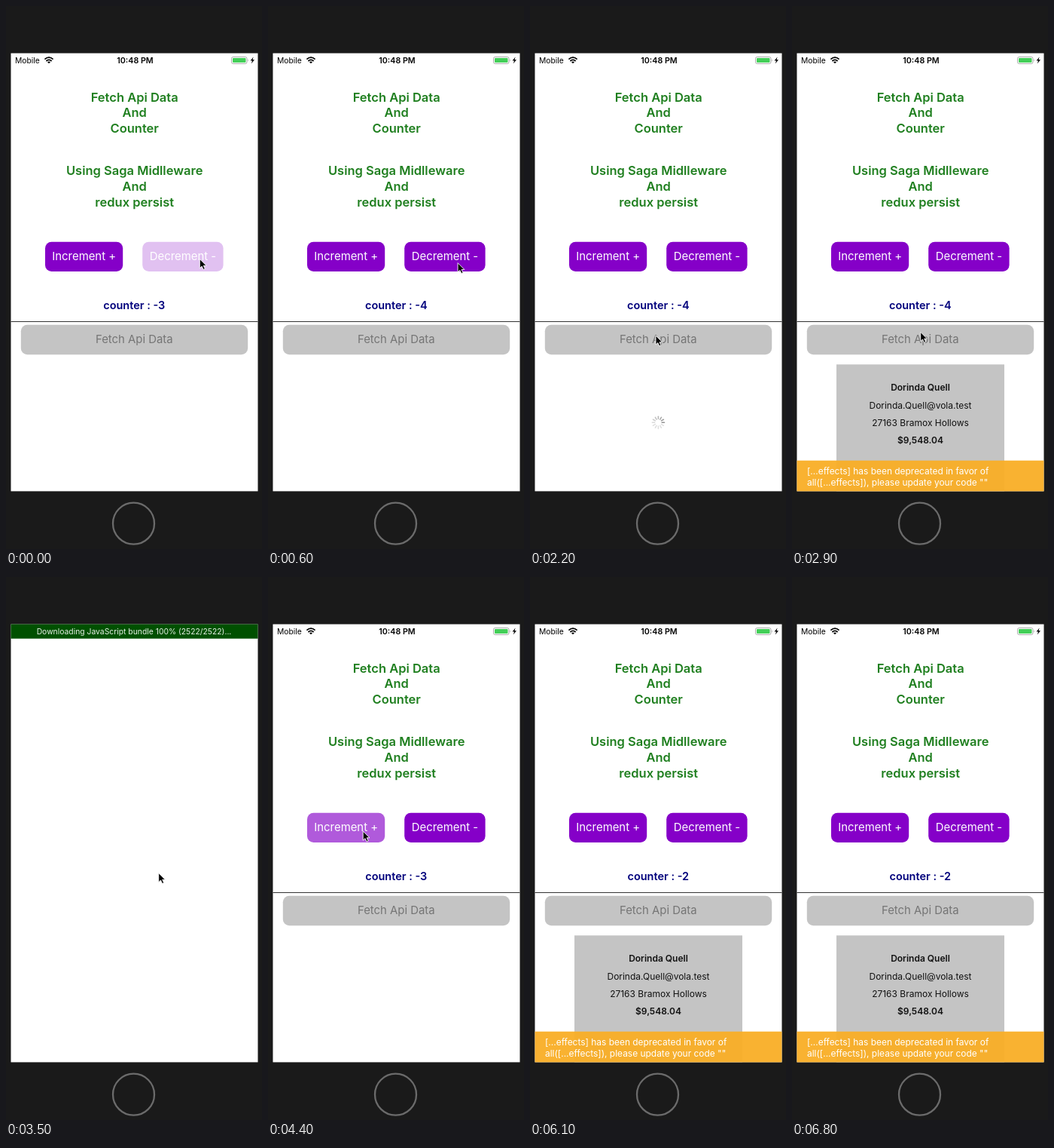
These frames come from a looping animation (340 by 720 pixels, 6.9 s). An HTML page:

```html
<!DOCTYPE html>
<html lang="en">
<head>
<meta charset="utf-8">
<title>Counter and fetch demo</title>
<style>
  html, body { margin: 0; width: 100%; height: 100%; overflow: hidden; background: #1a1a1a; }
  svg { display: block; width: 340px; height: 720px; font-family: Inter, Roboto, sans-serif; }
  .mid { text-anchor: middle; }
  .bold { font-weight: 600; }
  .title { font-size: 16.5px; fill: #1f7f1f; }
  .label { font-size: 14.9px; }
  .card { font-size: 12px; fill: #111; }
  .warn { font-size: 11.95px; fill: #fff; }
</style>
</head>
<body>
<svg viewBox="0 0 340 720">
  <rect width="340" height="720" fill="#1a1a1a"/>
  <rect x="6.5" y="62.6" width="328" height="580.8" fill="#fff"/>
  <circle cx="169.5" cy="686.2" r="27.5" fill="none" stroke="#6b6b6b" stroke-width="2.3"/>

  <g id="status">
    <text x="12" y="75.5" font-size="10.3">Mobile</text>
    <g fill="none" stroke="#000" stroke-width="1.7">
      <path d="M51.4 70.6Q57 65.6 62.6 70.6M53.4 73Q57 69.8 60.6 73"/>
      <path d="M55 74.2Q57 72.6 59 74.2L57 76.3Z" fill="#000" stroke="none"/>
    </g>
    <text class="mid bold" x="171.5" y="75.7" font-size="10.7">10:48 PM</text>
    <rect x="299.5" y="67.5" width="20.5" height="9" rx="2.2" fill="#fff" stroke="#999" stroke-width=".8"/>
    <rect x="301" y="69" width="17.5" height="6" rx="1" fill="#43cf58"/>
    <path d="M321 70.3q1.4 1.7 0 3.4z" fill="#999"/>
    <path d="M328.6 67.5L324.6 72.6H327L325.8 76.5L330 71.2H327.5Z"/>
  </g>

  <g id="app">
    <g id="titles" class="title mid bold"></g>
    <g id="increment">
      <rect x="52" y="312.8" width="103.2" height="39.3" rx="8.5" fill="#8500c8"/>
      <text class="label mid" x="103.7" y="337" fill="#fff">Increment +</text>
    </g>
    <g id="decrement">
      <rect x="181.2" y="312.8" width="107.4" height="39.3" rx="8.5" fill="#8500c8"/>
      <text class="label mid" x="235" y="337" fill="#fff">Decrement -</text>
    </g>
    <text id="counter" class="mid bold" x="170.3" y="401.6" font-size="14.5" fill="#00007c"></text>
    <rect x="6.5" y="418" width="328" height="1" fill="#333"/>
    <g id="fetch">
      <rect x="19.8" y="422.8" width="301.4" height="39.5" rx="8.5" fill="#c4c4c4"/>
      <text class="label mid" x="170.3" y="447.3" fill="#757575">Fetch Api Data</text>
    </g>
    <g id="spinner" stroke-width="1.5" stroke-linecap="round"></g>
    <g id="card" class="card mid">
      <rect x="59" y="475.3" width="223" height="168" fill="#c4c4c4"/>
      <text class="bold" x="170.5" y="510">Dorinda Quell</text>
      <text x="170.5" y="533.5">Dorinda.Quell@vola.test</text>
      <text x="170.5" y="556.7">27163 Bramox Hollows</text>
      <text class="bold" x="170.5" y="580.2">$9,548.04</text>
    </g>
    <g id="warning" class="warn">
      <rect x="6.5" y="602.7" width="328" height="40.7" fill="#f9ae26" opacity=".95"/>
      <text x="20" y="621.3">[...effects] has been deprecated in favor of</text>
      <text x="20" y="636">all([...effects]), please update your code ""</text>
    </g>
  </g>

  <g id="loading">
    <rect x="6.5" y="62.6" width="328" height="19.1" fill="#005000"/>
    <text class="mid" x="170" y="76.2" font-size="10.35" fill="#e8f0e8">Downloading JavaScript bundle 100% (2522/2522)...</text>
  </g>

  <path id="cursor" d="M0 0V12.2L2.8 9.6L4.8 14L7 13L5 8.8H8.8Z" fill="#000" stroke="#fff" stroke-width=".9" stroke-linejoin="round"/>
</svg>
<script>
const LOOP = 6900, STEP = 100;
const NS = "http://www.w3.org/2000/svg";
const $ = id => document.getElementById(id);

function add(parent, tag, attrs, text = "") {
  const node = document.createElementNS(NS, tag);
  for (const key in attrs) node.setAttribute(key, attrs[key]);
  node.textContent = text;
  parent.append(node);
  return node;
}

const show = (id, on) => $(id).setAttribute("display", on ? "inline" : "none");
const within = (t, ...spans) => spans.some(([from, to]) => t >= from && t < to);
const clamp = v => Math.max(0, Math.min(1, v));
const ease = v => v * v * (3 - 2 * v);

[["Fetch Api Data", 127], ["And", 147.3], ["Counter", 168],
 ["Using Saga Midlleware", 224.3], ["And", 245], ["redux persist", 265.6]]
  .forEach(([text, y]) => add($("titles"), "text", { x: 170.7, y }, text));

const SPOKES = 12;
const spokes = Array.from({ length: SPOKES }, (_, i) =>
  add($("spinner"), "path", { d: "M170.4 547.6V544.2", transform: `rotate(${i * 360 / SPOKES} 170.4 552.3)` }));

// [press, release] times for each button
const taps = {
  decrement: [[-150, 0]],
  increment: [[4100, 4270], [4500, 4620]],
  fetch: [[1450, 1600], [5000, 5180]]
};

// [start, end] times of each request, and when its result leaves the screen
const requests = [[1600, 2500], [5200, 5900]];
const results = [[2500, 3000], [5900, LOOP]];

function touchOpacity(t, presses) {
  return presses.reduce((opacity, [press, release]) => {
    const down = ease(clamp((t - press) / 120));
    const up = ease(clamp((t - release) / 250));
    return Math.min(opacity, 1 - 0.76 * down * (1 - up));
  }, 1);
}

// [time, x, y] of the pointer tip
const route = [
  [0, 257.3, 335.5], [500, 257.3, 335.5], [1200, 162.6, 428.5], [1450, 167, 437],
  [2800, 167, 437], [3300, 202.7, 392.5], [3600, 202.7, 392.5], [4100, 126.2, 337],
  [4650, 126.2, 337], [4900, 159.5, 453], [6000, 159.5, 453]
];

function pointerAt(t) {
  const i = Math.max(1, route.findIndex(point => point[0] >= t));
  const [t0, x0, y0] = route[i - 1], [t1, x1, y1] = route[i];
  const k = ease(clamp((t - t0) / (t1 - t0)));
  return [x0 + (x1 - x0) * k, y0 + (y1 - y0) * k];
}

function count(t) {
  if (t < 100) return -3;
  if (t < 4300) return -4;
  return t < 4700 ? -3 : -2;
}

function drawSpinner(t) {
  const request = requests.find(span => within(t, span));
  show("spinner", request);
  if (!request) return;
  const head = Math.floor((t - request[0]) / 1000 * SPOKES) + 8;
  spokes.forEach((spoke, i) => {
    const age = ((head - i) % SPOKES + SPOKES) % SPOKES;
    const shade = Math.min(222, 145 + age * 12);
    spoke.setAttribute("stroke", `rgb(${shade},${shade},${shade})`);
  });
}

function render(t) {
  for (const id in taps) $(id).setAttribute("opacity", touchOpacity(t, taps[id]));
  $("counter").textContent = `counter : ${count(t)}`;

  show("app", !within(t, [3000, 3800]));
  show("loading", within(t, [3000, 4300]));
  show("status", !within(t, [3000, 4300]));
  show("card", within(t, ...results));
  show("warning", within(t, ...results));
  drawSpinner(t);

  show("cursor", t < 6000);
  if (t < 6000) $("cursor").setAttribute("transform", `translate(${pointerAt(t)})`);
}

function tick() {
  render(Math.floor(performance.now() % LOOP / STEP) * STEP);
  requestAnimationFrame(tick);
}
tick();
</script>
</body>
</html>
```
